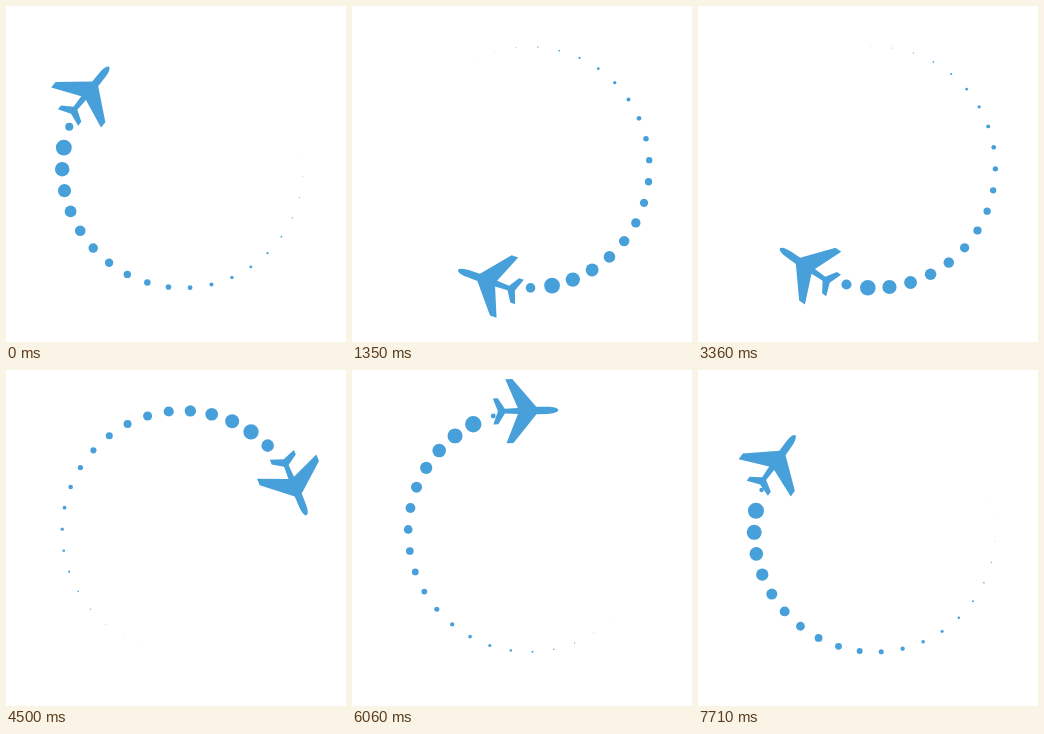
An HTML page for the animation above (7.74 s loop, 340 by 336 pixels).

```html
<!DOCTYPE html>
<html lang="en">
<head>
<meta charset="utf-8">
<title>Circling plane</title>
<style>
  html, body { margin: 0; width: 100%; height: 100%; overflow: hidden; background: #fff; }
  svg { display: block; width: 340px; height: 336px; fill: #47a0d9; }
</style>
</head>
<body>
<svg viewBox="0 0 340 336">
  <g id="dots"></g>
  <path id="plane" d="M32 0 C31.5 -2.6 26 -3.6 21 -3.6 L10 -3.8 L-13.5 -32 L-20.5 -32
    L-8.5 -3 L-21.5 -2.4 L-28.3 -13 L-33.3 -13 L-28.5 0 L-33.3 13 L-28.3 13 L-21.5 2.4
    L-8.5 3 L-20.5 32 L-13.5 32 L10 3.8 L21 3.6 C26 3.6 31.5 2.6 32 0 Z"/>
</svg>
<script>
  const LOOP = 7740, STEP = 30;
  const CX = 176.8, CY = 161.3, R = 120.6;
  const COUNT = 35, GAP = 360 / COUNT;
  const START = 218.9, TURN = 1442.2;         // plane angle at the loop start, degrees per loop
  const DRIFT = 10;                           // slots the ring slips back per loop
  const BORN = 7, PEAK = 26, GONE = 275;      // degrees behind the plane
  const MAX_R = 8.2;

  const plane = document.getElementById('plane');
  const ring = document.getElementById('dots');
  const dots = Array.from({ length: COUNT }, () =>
    ring.appendChild(document.createElementNS('http://www.w3.org/2000/svg', 'circle')));

  const rad = deg => deg * Math.PI / 180;
  const mod = deg => ((deg % 360) + 360) % 360;

  function place(deg) {
    return [CX + R * Math.cos(rad(deg)), CY + R * Math.sin(rad(deg))];
  }

  // Dots swell just behind the tail, then fade out in size.
  function dotRadius(behind) {
    if (behind <= BORN || behind >= GONE) return 0;
    return behind < PEAK
      ? MAX_R * ((behind - BORN) / (PEAK - BORN)) ** 1.6
      : MAX_R * ((GONE - behind) / (GONE - PEAK)) ** 2.2;
  }

  function draw(time) {
    const p = Math.floor(time / STEP) * STEP % LOOP / LOOP;
    const sway = -0.8 * Math.sin(2 * Math.PI * p);
    const angle = START + TURN * p + sway;
    const [x, y] = place(angle);
    plane.setAttribute('transform', `translate(${x} ${y}) rotate(${angle + 90})`);

    dots.forEach((dot, i) => {
      const a = 4.25 + GAP * (i - DRIFT * p);
      const [dx, dy] = place(a);
      dot.setAttribute('cx', dx);
      dot.setAttribute('cy', dy);
      dot.setAttribute('r', dotRadius(mod(angle - a)));
    });
  }

  const start = performance.now();
  function tick() {
    draw(performance.now() - start);
    requestAnimationFrame(tick);
  }
  tick();
</script>
</body>
</html>
```
